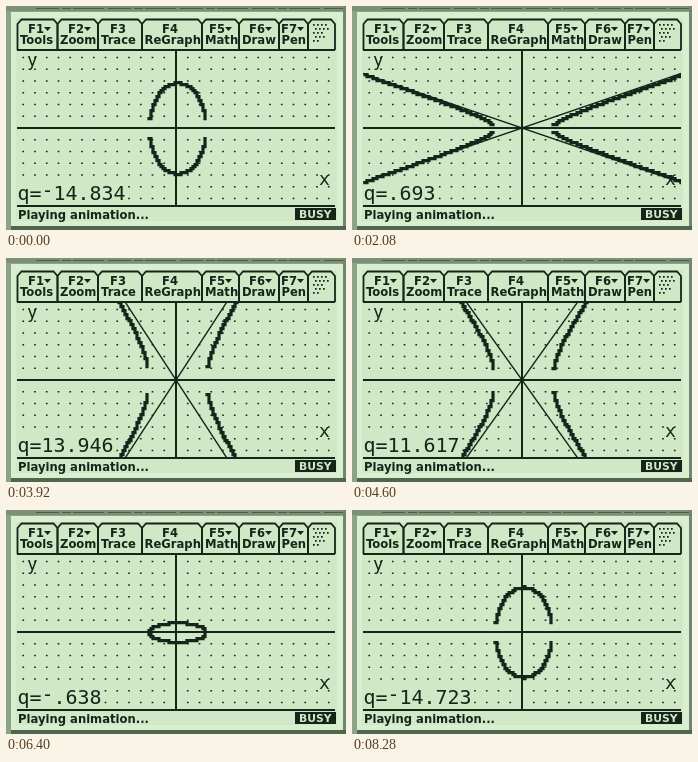
These frames come from a looping animation (340x224 px, 8.38 s). An HTML page:

```html
<!DOCTYPE html>
<html lang="en">
<head>
<meta charset="utf-8">
<title>Conic sections on a graphing calculator</title>
<style>
  html, body { margin: 0; width: 100%; height: 100%; overflow: hidden; background: #71866e; }
  svg { display: block; width: 340px; height: 224px; --ink: #14261a; --lcd: #d0e8c6; }
  text { fill: var(--ink); white-space: pre; }
  .small { font: bold 11.6px "DejaVu Sans", sans-serif; }
  .large { font: 19.93px "DejaVu Sans Mono", monospace; }
  .line { fill: none; stroke: var(--ink); }
  .ink { fill: var(--ink); }
  .lcd { fill: var(--lcd); }
  .crisp { shape-rendering: crispEdges; }
</style>
</head>
<body>
<svg viewBox="0 0 340 224">
  <defs>
    <clipPath id="plot"><rect x="11" y="45" width="318" height="154"/></clipPath>
  </defs>

  <rect width="340" height="224" fill="#8ca388"/>
  <rect width="340" height="5" fill="#7b9077"/>
  <path d="M30 2.5H340" stroke="#4b5f4b" stroke-dasharray="23 3 9 2 31 4"/>
  <rect x="337" width="3" height="224" fill="#71866e"/>
  <rect x="5" y="220" width="335" height="4" fill="#50664f"/>
  <rect x="5" y="6" width="332" height="214" fill="#daeed0"/>
  <rect class="lcd" x="10" y="12" width="321" height="203"/>

  <g id="tabs"></g>
  <path id="dots" class="ink"/>
  <g class="line crisp" stroke-width="2">
    <path d="M11 44H329M11 122H329M170 44V200"/>
    <path d="M11 200H329" stroke-width="1.5"/>
  </g>
  <g clip-path="url(#plot)">
    <path id="asymptotes" class="line" stroke-width="1.4"/>
    <path id="curve" class="line" stroke-width="3.2" stroke-linecap="square" transform="translate(1 .7)"/>
  </g>

  <text class="large" x="21" y="60" style="font-size:17.5px">y</text>
  <text class="large" x="313" y="179" style="font-size:18px">x</text>
  <rect id="mask" class="lcd" x="12" y="179" height="18"/>
  <text class="large" x="11.5" y="194">q=<tspan id="sign"></tspan><tspan id="value"></tspan></text>

  <text class="small" x="12" y="212.5">Playing animation...</text>
  <rect class="ink" x="289" y="202" width="41" height="12"/>
  <text class="small" x="293" y="212" style="font-size:10.8px;fill:var(--lcd)">BUSY</text>
</svg>

<script>
const $ = id => document.getElementById(id);
const CX = 170, CY = 122, PX = 2, UNIT = 11.75, HALF_WIDTH = 28.6;
const LOOP = 8380, STEP = 40, LAST = 8280, STEPS = 541;

// [time in ms, parameter step]
const KEYS = [[0, 3], [1240, 172], [2800, 378], [3920, 522], [4080, 541],
              [5360, 390], [6400, 259], [8280, 5]];

// [left edge, right edge, key x, key, has menu, name x, name]
const TABS = [
  [11.5, 51.5, 22, 'F1', 1, 14, 'Tools'],
  [51.5, 92, 62, 'F2', 1, 54, 'Zoom'],
  [92, 136, 104, 'F3', 0, 95, 'Trace'],
  [136, 196, 156, 'F4', 0, 138.5, 'ReGraph'],
  [196, 233, 203, 'F5', 1, 199, 'Math'],
  [233, 273, 243, 'F6', 1, 236, 'Draw'],
  [273, 302, 275, 'F7', 1, 275.5, 'Pen'],
  [302, 329]
];

function drawTabs() {
  let s = '';
  for (const [l, r, kx, key, menu, nx, name] of TABS) {
    s += `<path class="line" stroke-width="1.8" d="M${l} 44V18L${l + 4} 13.5H${r - 4}L${r} 18V44"/>`;
    if (key) s += `<text class="small" x="${kx}" y="27">${key}</text>
      <text class="small" x="${nx}" y="38">${name}</text>`;
    if (menu) s += `<path class="ink" d="M${kx + 16} 21h7l-3.5 4z"/>`;
  }
  // speckled icon that thins out downwards
  let icon = '';
  for (let row = 0; row < 5; row++)
    for (let i = 0; i < 4 - row / 2; i++)
      icon += `M${307 + i * 4 + row % 2 * 2} ${18 + row * 4}h1.7v1.7h-1.7z`;
  $('tabs').innerHTML = s + `<path class="ink" d="${icon}"/>`;
}

function drawDots() {
  let d = '';
  for (let j = -6; j <= 6; j++)
    for (let i = -13; i <= 13; i++)
      d += `M${CX + i * UNIT - .85} ${CY + j * UNIT - .85}h1.7v1.7h-1.7z`;
  $('dots').setAttribute('d', d);
}

function stepAt(t) {
  const i = Math.max(1, KEYS.findIndex(k => k[0] >= t));
  const [t0, a] = KEYS[i - 1], [t1, b] = KEYS[i];
  return Math.round(a + (b - a) * (t - t0) / (t1 - t0));
}

// One half of the conic as stairs, sampled once per LCD column
function halfCurve(q, side) {
  let d = '', open = false;
  for (let x = -158; x <= 158; x += PX) {
    const h2 = q * ((x / HALF_WIDTH) ** 2 - 1);
    if (h2 < 0) { open = false; continue; }
    const y = CY + side * Math.round(Math.sqrt(h2) * UNIT / PX) * PX;
    d += open ? `H${CX + x}V${y}` : `M${CX + x} ${y}`;
    open = true;
  }
  return d;
}

function asymptotes(q) {
  if (q < 0) return '';
  const y = 160 * Math.sqrt(q) * UNIT / HALF_WIDTH;
  return `M${CX - 160} ${CY - y}L${CX + 160} ${CY + y}M${CX - 160} ${CY + y}L${CX + 160} ${CY - y}`;
}

function render(q) {
  const negative = q < 0;
  const digits = Math.abs(q).toFixed(3).replace(/^0/, '').replace(/0+$/, '');
  $('curve').setAttribute('d', halfCurve(q, -1) + halfCurve(q, 1));
  $('asymptotes').setAttribute('d', asymptotes(q));
  $('sign').textContent = negative ? '-' : '';
  $('sign').setAttribute('dy', negative ? -3 : 0);
  $('value').textContent = digits;
  $('value').setAttribute('dy', negative ? 3 : 0);
  $('mask').setAttribute('width', 12 * (digits.length + (negative ? 3 : 2)));
}

let shown = -1;
const start = performance.now();
function tick() {
  const t = Math.max(0, performance.now() - start) % LOOP;
  const k = stepAt(Math.min(LAST, Math.floor(t / STEP) * STEP));
  if (k !== shown) render(-15 + 30 * k / STEPS);
  shown = k;
  requestAnimationFrame(tick);
}

drawTabs();
drawDots();
tick();
</script>
</body>
</html>
```
